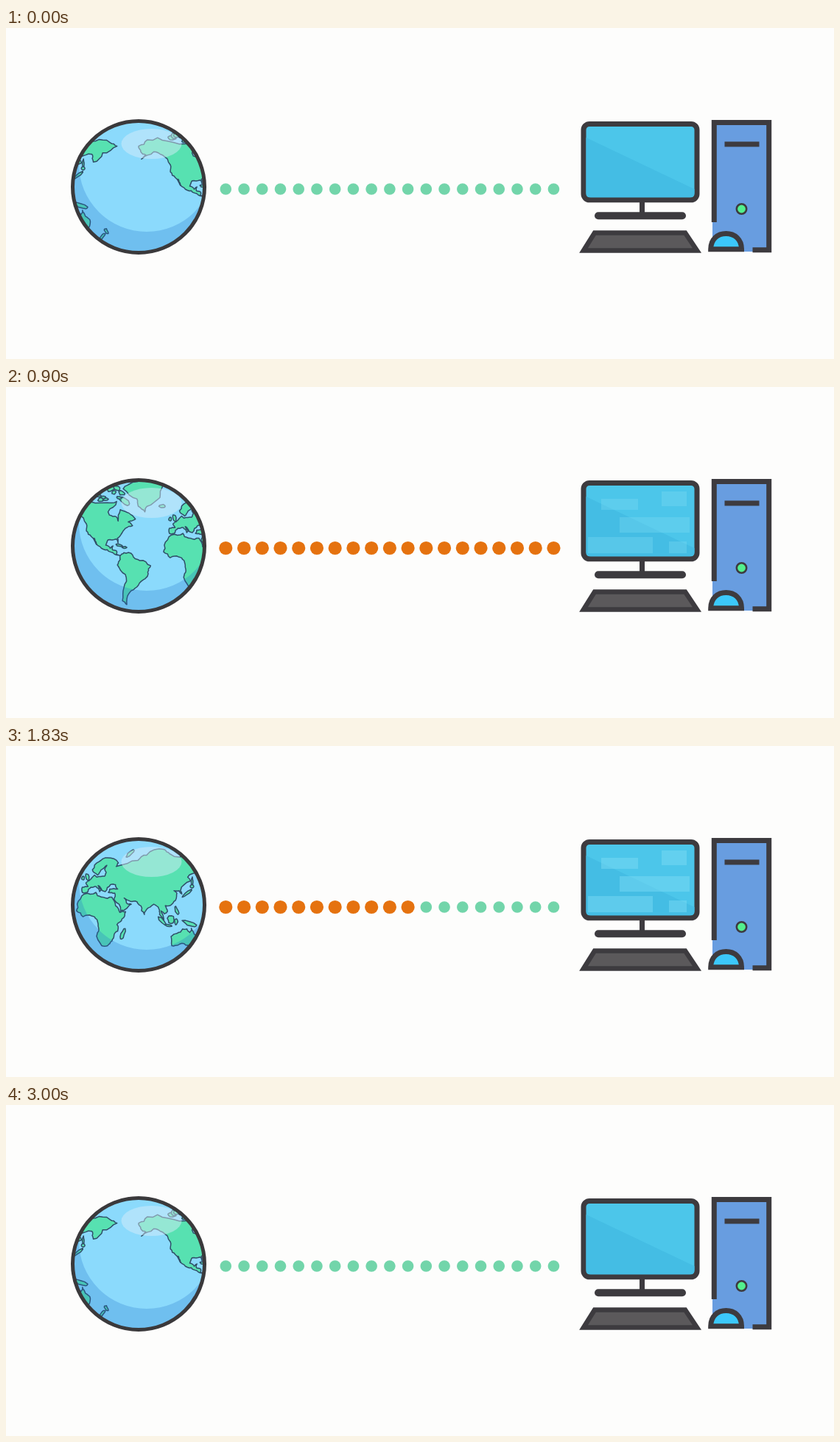
These frames come from a looping animation (1124x450 px, 3.03 s). An HTML page:

```html
<!DOCTYPE html>
<html lang="en">
<head>
<meta charset="utf-8">
<title>Globe to computer transfer</title>
<style>
html, body { margin: 0; width: 100%; height: 100%; overflow: hidden; background: #fdfdfc; }
svg { display: block; width: 100vw; height: 100vh; }
</style>
</head>
<body>
<svg viewBox="0 0 1124 450" xmlns="http://www.w3.org/2000/svg">
  <defs>
    <clipPath id="disc"><circle cx="180" cy="216" r="90"/></clipPath>
    <g id="map" fill="#57e1b1" stroke="#2f4f68" stroke-width="1.500" stroke-linejoin="round"></g>
  </defs>
  <rect width="1124" height="450" fill="#fdfdfc"/>

  <g clip-path="url(#disc)">
    <rect x="88" y="124" width="184" height="184" fill="#8bdafc"/>
    <g id="world">
      <use href="#map" x="-380"/><use href="#map"/><use href="#map" x="380"/>
    </g>
    <path d="M88 124H272V308H88ZM99 185a92 92 0 0 0 184 0a92 92 0 0 0 -184 0Z"
      fill="#1e6ec8" fill-opacity=".25" fill-rule="evenodd"/>
    <ellipse cx="197.500" cy="157.500" rx="41" ry="20.500" fill="#d8ecf8" fill-opacity=".48"/>
  </g>
  <circle cx="180" cy="216" r="89.500" fill="none" stroke="#3a393b" stroke-width="5"/>

  <g id="dots"></g>

  <g stroke="#3d3b3f" stroke-width="7" fill="none">
    <path d="M863.500 235V254"/>
    <path d="M804 255.300H918" stroke-width="10" stroke-linecap="round"/>
    <rect x="784" y="130.500" width="154" height="103.300" rx="8" fill="#4cc6ea"/>
    <path d="M787.500 149L934.500 219V224Q934.500 230.300 928 230.300H794Q787.500 230.300 787.500 224Z" fill="#44bde4" stroke="none"/>
    <g id="blocks" fill="#7fdcf3" fill-opacity=".45" stroke="none"></g>
    <path d="M784 302.500L799 278.500H922L938 302.500Z" fill="#5b595b" stroke-width="6.500"/>
    <rect x="959" y="127" width="78" height="177" fill="#689de0" stroke="none"/>
    <path d="M961.300 264V128.500H1035.700V301.700H1013.500"/>
    <path d="M975.500 158H1022.500"/>
    <circle cx="998.500" cy="246" r="6.700" fill="#52f08d" stroke-width="2.600"/>
    <path d="M956.700 300.700C956.700 287 966 279.500 977.500 279.500S998.500 287 998.500 300.700Z" fill="#3cc8fa"/>
  </g>
</svg>
<script>
const NS = "http://www.w3.org/2000/svg";
const $ = id => document.getElementById(id);
const add = (parent, tag, attrs) => {
  const el = parent.appendChild(document.createElementNS(NS, tag));
  for (const k in attrs) el.setAttribute(k, attrs[k]);
  return el;
};

const LOOP = 3030, STEPS = 90, MAP_WIDTH = 380, PX_PER_DEG = 0.98;

let seed = 7;
const random = () => (seed = seed * 16807 % 2147483647) / 2147483647;

// Miller projection of degrees to the map strip.
function project([lon, lat]) {
  const rise = 1.25 * Math.log(Math.tan(Math.PI / 4 + 0.4 * lat * Math.PI / 180));
  return [344.6 + PX_PER_DEG * lon, 237 - PX_PER_DEG * rise * 180 / Math.PI];
}

// Inserts displaced midpoints to give a ragged coast.
const roughen = points => points.flatMap(([x, y], i) => {
  const [x2, y2] = points[(i + 1) % points.length];
  const push = (random() - 0.5) * 0.32;
  return [[x, y], [(x + x2) / 2 + (y2 - y) * push, (y + y2) / 2 - (x2 - x) * push]];
});

const drawLand = points =>
  add($("map"), "polygon", { points: points.map(p => p.map(v => v.toFixed(1))).join(" ") });

// Turning points of each coast: longitude, latitude.
const coasts = {
  northAmerica: "-168,66 -156,71 -128,70 -95,68 -82,69 -94,60 -92,57 -82,55 -80,51 -77,62 -65,59 -56,53 -66,50 -60,46 -70,43 -75,37 -81,31 -80,25 -83,30 -94,29 -97,22 -91,18 -87,21 -88,16 -83,15 -82,9 -77,8 -85,10 -95,16 -105,20 -113,31 -110,23 -117,33 -124,40 -124,48 -135,58 -147,61 -164,54 -158,58 -165,61",
  southAmerica: "-77,8 -72,12 -60,9 -50,1 -35,-6 -39,-15 -41,-22 -48,-27 -57,-36 -65,-42 -68,-54 -74,-50 -72,-35 -70,-18 -81,-5 -77,3",
  greenland: "-73,78 -60,82 -32,83 -18,80 -22,72 -40,65 -43,60 -52,65 -54,71",
  africa: "-6,35 10,37 12,33 20,31 32,31 37,20 43,11 51,12 46,2 39,-6 40,-15 35,-20 32,-28 26,-34 18,-34 12,-17 13,-8 9,3 4,6 -8,5 -17,13 -16,22",
  eurasia: "-9,37 -9,43 -1,44 -4,48 8,56 11,54 22,55 24,59 22,61 25,65 17,61 12,56 5,61 14,68 26,71 41,67 38,64 68,69 80,73 104,77 112,74 140,73 160,70 180,69 190,66 170,60 157,51 156,58 150,59 137,54 141,50 127,39 129,35 125,39 118,39 122,36 121,29 115,22 106,20 109,12 105,9 100,13 104,1 98,8 97,16 90,22 80,15 77,8 72,20 67,25 57,26 49,30 52,24 59,22 52,16 44,13 35,28 36,36 27,37 29,41 40,41 37,46 30,46 23,38 13,45 18,40 15,38 10,44 3,43 -2,37",
  australia: "114,-22 122,-18 130,-12 136,-12 140,-17 142,-11 146,-19 153,-26 150,-37 144,-39 138,-34 131,-31 124,-33 115,-34"
};
for (const line of Object.values(coasts)) {
  const corners = line.split(" ").map(pair => project(pair.split(",").map(Number)));
  drawLand(roughen(roughen(corners)));
}

// A ragged oval, radii in pixels, tilt in degrees.
function island(lon, lat, rx, ry, tilt = 0) {
  const [cx, cy] = project([lon, lat]);
  const cos = Math.cos(tilt * Math.PI / 180), sin = Math.sin(tilt * Math.PI / 180);
  drawLand(Array.from({ length: 10 }, (_, i) => {
    const angle = i * Math.PI / 5, size = 0.75 + random() * 0.5;
    const x = rx * size * Math.cos(angle), y = ry * size * Math.sin(angle);
    return [cx + x * cos - y * sin, cy + x * sin + y * cos];
  }));
}

island(-19, 65, 4.5, 2.5);       // Iceland
island(-2, 54, 2.5, 5, -15);     // Britain
island(-8, 53, 1.7, 2.3);        // Ireland
island(-79, 22, 5, 1.2, 15);     // Cuba
island(-71, 19, 3, 1.2);         // Hispaniola
island(47, -19, 2.5, 7, 18);     // Madagascar
island(57, 74, 7, 2, -40);       // Novaya Zemlya
island(18, 79, 6, 2.5);          // Svalbard
island(136, 36, 8, 1.8, -40);    // Honshu
island(143, 44, 2.5, 2);         // Hokkaido
island(143, 50, 1.2, 5);         // Sakhalin
island(122, 13, 2, 6, -20);      // Philippines
island(101, 0, 8, 2, 45);        // Sumatra
island(110, -7, 5, 1.2, 8);      // Java
island(114, 1, 4.5, 5, 20);      // Borneo
island(121, -2, 2, 4);           // Sulawesi
island(141, -5, 10, 3, 22);      // New Guinea
island(175, -38, 2, 4, -30);     // New Zealand
island(170, -44, 1.7, 5, 40);
island(-71, 69, 10, 4, 40);      // Baffin
for (let i = 0; i < 14; i++)     // Arctic archipelago
  island(-122 + 3.6 * i, 70 + random() * 10, 3 + random() * 3, 1.5 + random() * 2, random() * 60 - 30);

const dots = Array.from({ length: 19 }, (_, i) =>
  add($("dots"), "circle", { cx: 298.3 + 24.73 * i, cy: 219 }));

// x, y, width, height
[[808, 152, 50, 15], [890, 142, 34, 20], [790, 204, 88, 22], [833, 177, 95, 21], [900, 210, 24, 16]]
  .forEach(([x, y, width, height]) => add($("blocks"), "rect", { x, y, width, height }));

const clamp = v => Math.max(0, Math.min(1, v));
const pulse = (n, peak, slope) => 19.7 - slope * Math.abs(n - peak);

function draw(ms) {
  // Steps last 100/3 ms, rounded to 10 ms.
  const n = Math.floor((Math.floor(ms / 10) + 0.5) * 0.3);
  $("world").setAttribute("transform", `translate(${-MAP_WIDTH * n / STEPS})`);

  const lit = Math.floor(Math.max(0, pulse(n, 26.6, 1.05), pulse(n, 65.4, 0.83)));
  dots.forEach((dot, i) => {
    dot.setAttribute("r", i < lit ? 9.1 : 7.8);
    dot.setAttribute("fill", i < lit ? "#e5720f" : "#72d5aa");
  });

  const phase = n % (STEPS / 2);
  $("blocks").setAttribute("opacity", clamp((phase - 4) / 5) * clamp((30 - phase) / 4));
}

const start = performance.now();
function tick() {
  draw((performance.now() - start) % LOOP);
  requestAnimationFrame(tick);
}
tick();
</script>
</body>
</html>
```
